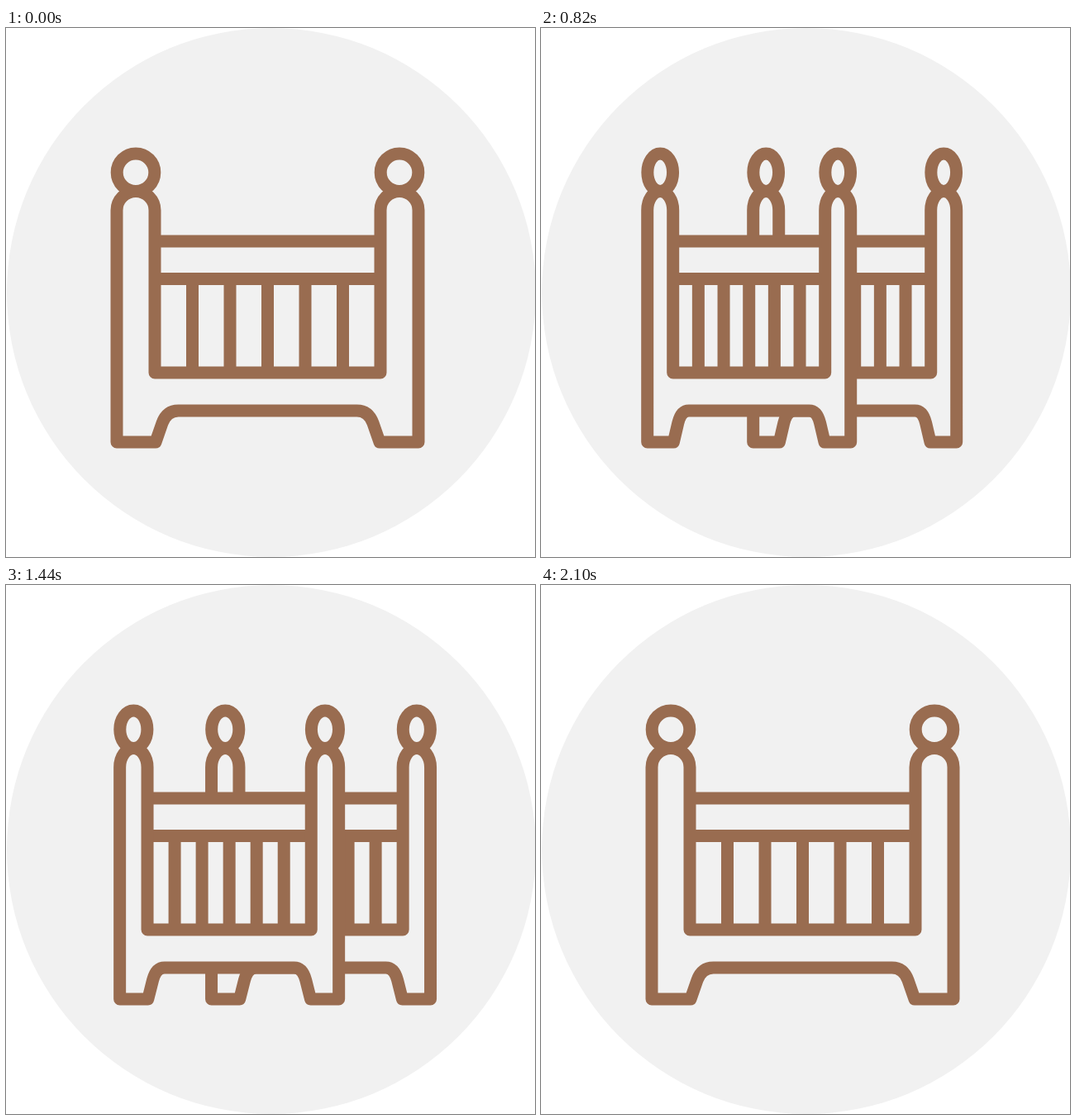
An HTML page with a canvas that plays this animation: 640x640 px, repeating every 2.4 s.

```html
<!DOCTYPE html>
<html lang="en">
<head>
<meta charset="utf-8">
<title>Crib</title>
<style>
  html, body { margin: 0; width: 100%; height: 100%; overflow: hidden; background: #fff; }
  canvas { display: block; width: 100vmin; height: 100vmin; }
</style>
</head>
<body>
<canvas id="stage" width="640" height="640"></canvas>
<script>
const ctx = document.getElementById('stage').getContext('2d');
const LOOP = 2400, STEP = 20;
const BROWN = '#996c50', GREY = '#f1f1f1';
const MID = 316.5, SPAN = 319;

// Key poses: time, narrowing, gap between the two sides, sideways drift
const KEYS = [
  [0, 0, 0, 0],
  [340, 40, 49, 0.4],
  [600, 87, 105.5, 0.1],
  [820, 104, 128, -0.8],
  [1080, 102, 125, 1.1],
  [1440, 87.4, 110.9, 9.1],
  [1640, 78, 99, 12.2],
  [2100, 0, 0, 0]
];

function slope(i, c) {
  if (i === 0 || i === KEYS.length - 1) return 0;
  const [a, b, d] = [KEYS[i - 1], KEYS[i], KEYS[i + 1]];
  const h0 = b[0] - a[0], h1 = d[0] - b[0];
  return ((b[c] - a[c]) / h0 * h1 + (d[c] - b[c]) / h1 * h0) / (h0 + h1);
}

// Smooth cubic through the key poses
function at(t, c) {
  const last = KEYS.length - 1;
  if (t >= KEYS[last][0]) return KEYS[last][c];
  let i = 0;
  while (t >= KEYS[i + 1][0]) i++;
  const a = KEYS[i], b = KEYS[i + 1], h = b[0] - a[0], u = (t - a[0]) / h;
  const ease = u * u * (3 - 2 * u);
  return a[c] + (b[c] - a[c]) * ease
    + h * u * (1 - u) * ((1 - u) * slope(i, c) - u * slope(i + 1, c));
}

// One side of the crib: only the centre lines narrow, the stroke stays even
function crib(cx, s) {
  const X = x => cx + x * s;
  const post = SPAN / 2;
  const outer = post + 23, inner = post - 23;

  const body = new Path2D();
  body.moveTo(X(-outer), 501);
  body.lineTo(X(-outer), 220.5);
  body.ellipse(X(-post), 220.5, 23 * s, 23, 0, Math.PI, 2 * Math.PI);
  body.lineTo(X(-inner), 417);
  body.lineTo(X(inner), 417);
  body.lineTo(X(inner), 220.5);
  body.ellipse(X(post), 220.5, 23 * s, 23, 0, Math.PI, 2 * Math.PI);
  body.lineTo(X(outer), 501);
  body.lineTo(X(135.5), 501);
  body.lineTo(X(127.5), 478);
  body.quadraticCurveTo(X(122), 463, X(108), 463);
  body.lineTo(X(-108), 463);
  body.quadraticCurveTo(X(-122), 463, X(-127.5), 478);
  body.lineTo(X(-135.5), 501);
  body.closePath();

  const panel = new Path2D();
  panel.rect(X(-inner), 258, 2 * inner * s, 159);

  const slats = new Path2D();
  for (const y of [258, 303.5]) {
    slats.moveTo(X(-inner), y);
    slats.lineTo(X(inner), y);
  }
  for (let i = -2; i <= 2; i++) {
    slats.moveTo(X(i * 45.5), 303.5);
    slats.lineTo(X(i * 45.5), 417);
  }

  const knobs = new Path2D();
  for (const x of [-post, post]) {
    knobs.moveTo(X(x) + 22.8 * s, 174.8);
    knobs.ellipse(X(x), 174.8, 22.8 * s, 22.8, 0, 0, 2 * Math.PI);
  }

  ctx.fillStyle = GREY;
  for (const p of [knobs, panel, body]) ctx.fill(p);
  for (const p of [slats, knobs, body]) ctx.stroke(p);
}

function draw(t) {
  ctx.fillStyle = '#fff';
  ctx.fillRect(0, 0, 640, 640);
  ctx.fillStyle = GREY;
  ctx.beginPath();
  ctx.arc(321, 320, 320, 0, 2 * Math.PI);
  ctx.fill();

  ctx.strokeStyle = BROWN;
  ctx.lineWidth = 15;
  ctx.lineJoin = 'round';
  const s = 1 - at(t, 1) / SPAN;
  const gap = at(t, 2) / 2;
  const cx = MID + at(t, 3);
  if (gap > 0) crib(cx + gap, s);
  crib(cx - gap, s);
}

const start = performance.now();
function tick() {
  const t = (performance.now() - start) % LOOP;
  draw(Math.floor(t / STEP) * STEP);
  requestAnimationFrame(tick);
}
tick();
</script>
</body>
</html>
```
